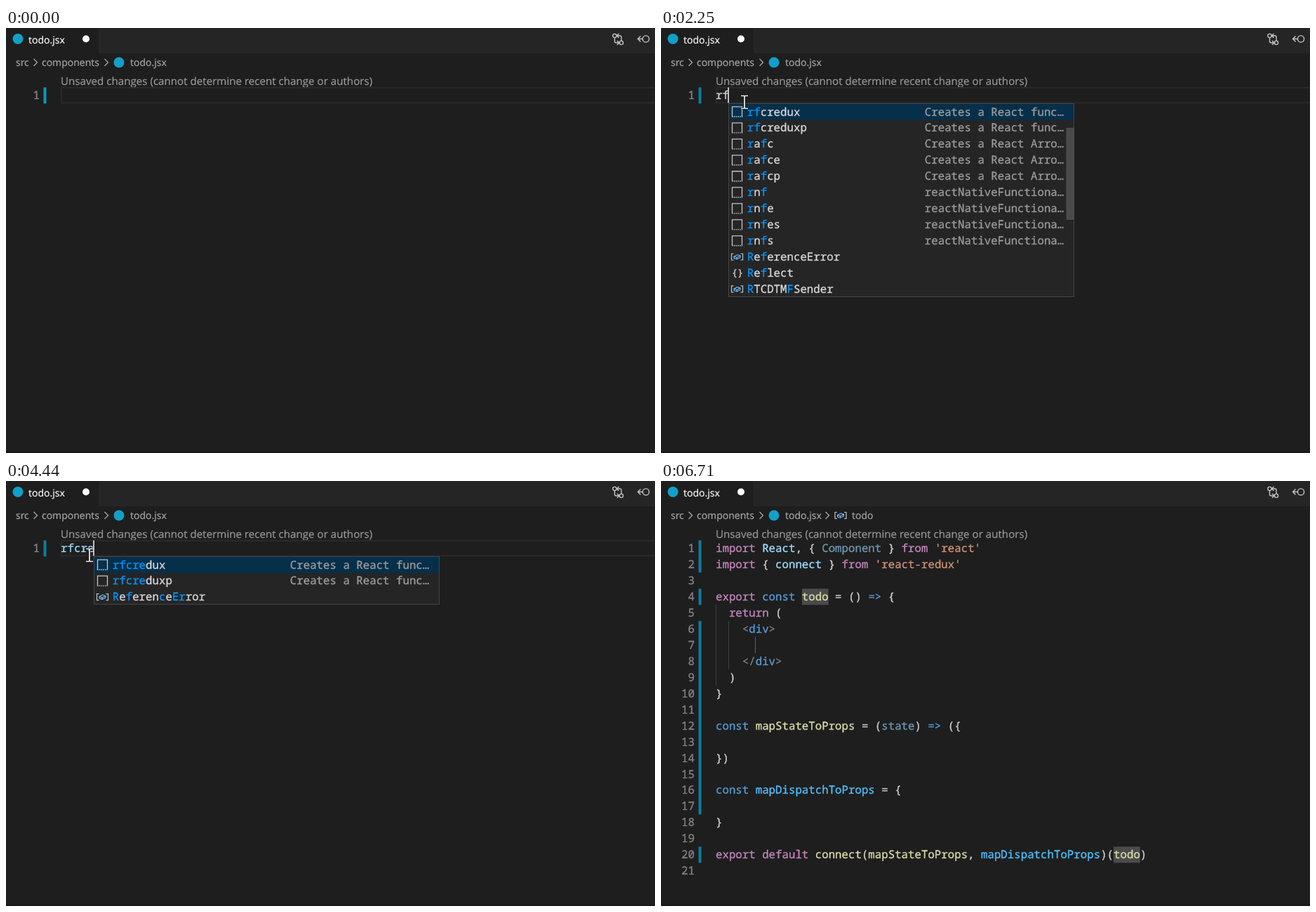
An HTML page for the animation above (6.94 s loop, 925 px wide and 605 px high).

```html
<!DOCTYPE html>
<html lang="en">
<head>
<meta charset="utf-8">
<title>Snippet completion</title>
<style>
html, body { margin: 0; width: 100%; height: 100%; overflow: hidden; background: #1e1e1e; }
svg { display: block; width: 925px; height: 605px; }
text { white-space: pre; text-rendering: geometricPrecision; font: 15.75px "Noto Sans Mono", monospace; }
text, tspan { fill: currentColor; stroke: currentColor; stroke-width: .32px; }
.ui { font: 14px "Open Sans", sans-serif; stroke-width: .2px; }
.lens { font-size: 15.15px; }
</style>
</head>
<body>
<svg id="stage" viewBox="0 0 925 605"></svg>
<script>
const LOOP = 6940, LEFT = 78, CHAR = 9.45, ROW = 22.95;
const COLORS = { p: '#c586c0', b: '#569cd6', y: '#dcdcaa', w: '#d4d4d4', v: '#9cdcfe',
  d: '#6d98ae', s: '#ce9178', c: '#4fc1ff', g: '#808080' };

// ~x switches to colour x
const CODE = [
  "~pimport ~vReact~w, { ~dComponent~w } ~pfrom ~s'react'",
  "~pimport ~w{ ~vconnect~w } ~pfrom ~s'react-redux'",
  '',
  '~pexport ~bconst ~ytodo~w = () ~b=>~w {',
  '~p  return ~w(',
  '~g    <~bdiv~g>',
  '',
  '~g    </~bdiv~g>',
  '~w  )',
  '~w}',
  '',
  '~bconst ~ymapStateToProps~w = (~dstate~w) ~b=>~w ({',
  '',
  '~w})',
  '',
  '~bconst ~cmapDispatchToProps~w = {',
  '',
  '~w}',
  '',
  '~pexport default ~yconnect~w(~ymapStateToProps~w, ~cmapDispatchToProps~w)(~ytodo~w)',
  ''
];

// kind, name (* marks a matched letter), detail
const FUNC = 'Creates a React Func…', REDUX = 'Creates a React func…',
  ARROW = 'Creates a React Arro…', NATIVE = 'reactNativeFunctiona…';
const LISTS = {
  rf: { thumb: [142, 131], rows: [
    ['s', '*r*fcredux', REDUX], ['s', '*r*fcreduxp', REDUX],
    ['s', '*ra*fc', ARROW], ['s', '*ra*fce', ARROW], ['s', '*ra*fcp', ARROW],
    ['s', '*rn*f', NATIVE], ['s', '*rn*fe', NATIVE], ['s', '*rn*fes', NATIVE], ['s', '*rn*fs', NATIVE],
    ['v', '*Re*ferenceError'], ['m', '*Re*flect'], ['v', '*RTCDTM*FSender']] },
  rfc: { thumb: [108, 220], rows: [
    ['s', '*r*f*c', FUNC], ['s', '*r*f*ce', FUNC], ['s', '*r*f*cp', FUNC],
    ['s', '*r*f*credux', REDUX], ['s', '*r*f*creduxp', REDUX],
    ['s', '*ra*f*c', ARROW], ['s', '*ra*f*ce', ARROW], ['s', '*ra*f*cp', ARROW],
    ['m', '*Re*fle*ct'], ['v', '*RTCDTM*FTone*ChangeEvent'],
    ['v', '*Re*feren*ceError'], ['v', '*RTCSsrc*Con*flictEvent']] },
  rfcr: { rows: [
    ['s', '*r*f*c*redux', REDUX], ['s', '*r*f*c*reduxp', REDUX], ['v', '*Re*feren*ceE*rror'],
    ['v', 'Pe*r*forman*ceObse*rver'], ['v', 'Pe*r*forman*ceSe*rverTiming']] },
  rfcre: { rows: [
    ['s', '*r*f*c*r*edux', REDUX], ['s', '*r*f*c*r*eduxp', REDUX], ['v', '*Re*feren*ce*E*rror']] }
};

const within = (t, a, b) => t >= a && t < b;
const at = (t, keys) => keys.filter(k => k[0] <= t).pop()[1];
const esc = s => s.replace(/</g, '&lt;').replace(/>/g, '&gt;');
const rect = (x, y, w, h, fill, more = '') =>
  `<rect x="${x}" y="${y}" width="${w}" height="${h}" fill="${fill}" ${more}/>`;
const line = (d, color, width = 1.3, more = '') =>
  `<path d="${d}" fill="none" stroke="${color}" stroke-width="${width}" ${more}/>`;
const dot = (x, y, r, fill) => `<circle cx="${x}" cy="${y}" r="${r}" fill="${fill}"/>`;
const ring = (x, y, r) => `<circle cx="${x}" cy="${y}" r="${r}" fill="none" stroke="#c5c5c5" stroke-width="1.4"/>`;
const span = (body, color) => `<tspan color="${color}">${body}</tspan>`;
const text = (x, y, body, color, more = '') => `<text x="${x}" y="${y}" color="${color}" ${more}>${body}</text>`;
const ui = (x, y, body, color) => text(x, y, body, color, 'class="ui"');
const chevron = x => line(`M${x - 2.5} 44l5 5l-5 5`, '#a9a9a9', 1.3);
const caret = (col, y) => rect(Math.floor(LEFT + CHAR * col) - 1, y, 2, 22, '#c0c1bf');
const bar = (y, rows, fill) => rect(53.5, y, 4, ROW * rows, fill);
const number = (n, y) => text(48, y, n, '#858585', 'text-anchor="end"');

function symbol(x, y) {
  return line(`M${x + 3} ${y - 4.5}h-3v9h3M${x + 13} ${y - 4.5}h3v9h-3`, '#c5c5c5', 1.2) +
    line(`M${x + 3.5} ${y - .5}l5-2.5l4 1.5v2.5l-5 2.5l-4-1.5zl4 1.5l5-2.5m-5 2.5v2.5`, '#75beff', 1.1);
}

function icon(kind, x, y) {
  if (kind === 'v') return symbol(x + 4, y);
  if (kind === 'm') return text(x + 4.5, y + 4, '{}', '#d0d0d0', 'style="font-size:13.5px"');
  return line(`M${x + 5} ${y + 7}v-14h14v14`, '#c5c5c5') +
    line(`M${x + 4.5} ${y + 7}h15`, '#c5c5c5', 1.4, 'stroke-dasharray="1.6 1.2"');
}

function popup(word) {
  const { rows, thumb } = LISTS[word];
  const x = Math.floor(LEFT + CHAR * word.length) + .5;
  let out = rect(x, 107.5, 492, 23 * rows.length - 1, '#252526', 'stroke="#454545"') +
    rect(x + .5, 108, 491, 23, '#062f4a');
  rows.forEach(([kind, name, detail], i) => {
    const y = 119.2 + i * ROW;
    out += icon(kind, x, y) +
      text(x + 26.3, y + 5.3, name.replace(/\*(.)/g, (_, c) => span(c, '#0097fb')), '#d8d8d8');
    if (detail) out += text(x + 279.3, y + 5.3, detail, '#9c9c9c');
  });
  if (thumb) out += rect(x + 481, thumb[0], 11, thumb[1], 'rgba(121,121,121,.45)');
  return out;
}

function chrome() {
  const c = '#c5c5c5';
  return rect(0, 0, 925, 36, '#252526') + rect(0, 0, 132, 36, '#1e1e1e') + rect(0, 603, 925, 2, '#1a151b') +
    dot(17, 15.5, 7.5, '#12a0c8') + ui(32, 21.5, 'todo.jsx', '#fff') + dot(114, 15.5, 5, '#fff') +
    ring(867.5, 11, 2.6) + ring(877, 21, 2.6) +
    line('M867.5 14v5q0 2 2 2h4m-2.5-3l3 3l-3 3M877 18v-5q0-2-2-2h-4m2.5-3l-3 3l3 3', c, 1.4) +
    ring(912, 15.5, 4.6) + line('M907 15.5h-6.5m4-4l-4 4l4 4', c, 1.4) +
    ui(14, 54, 'src', '#a9a9a9') + chevron(42) + ui(51, 54, 'components', '#a9a9a9') + chevron(143) +
    dot(161, 49, 7.5, '#12a0c8') + ui(177, 54, 'todo.jsx', '#a9a9a9');
}

const lens = () => text(LEFT, 81, 'Unsaved changes (cannot determine recent change or authors)', '#999', 'class="ui lens"');

function typing(t) {
  const word = at(t, [[0, ''], [1950, 'r'], [2160, 'rf'], [2800, 'rfc'], [3260, 'rfcr'], [3500, 'rfcre']]);
  const list = at(t, [[0, ''], [2240, 'rf'], [2880, 'rfc'], [3260, 'rfcr'], [3500, 'rfcre']]);
  const bare = within(t, 1950, 2160), top = bare ? 62 : 84.5;
  let out = bare ? '' : lens();
  out += rect(79, top + .5, 860, 21.5, 'none', 'stroke="#292929" stroke-width="2"') +
    bar(top, 1, t < 1950 ? '#0b98bb' : '#0c7d9d') + number(1, top + 16.7) +
    text(LEFT, top + 16.7, word, word.length === 2 ? COLORS.w : COLORS.v);
  if (within(t, 2410, 2800)) out += text(157, 101.2, 'You, a few seconds ago • Uncommitted changes', '#484848');
  if (within(t, 1160, 1700) || within(t, 1950, 3980) || t >= 4440) out += caret(word.length, top);
  return out + (list ? popup(list) : '');
}

function program(t) {
  const top = n => 84.5 + (n - 1) * ROW;
  const focused = t < 6230, blink = t < 5060 || within(t, 5540, 6060);
  let out = lens();
  if (t >= 5060) out += chevron(237) + symbol(248, 49) + ui(272, 54, 'todo', '#a9a9a9');
  for (const [n, rows] of [[1, 2], [4, 1], [6, 12], [20, 1]]) out += bar(top(n), rows, '#0c7d9d');
  for (const [col, n, rows, color] of [[0, 5, 5, '#404040'], [2, 6, 3, '#404040'], [6, 7, 1, '#606060']])
    out += rect(Math.floor(LEFT + col * CHAR), top(n), 1, rows * ROW, color);
  for (const [col, n] of [[13, 4], [60, 20]])
    out += rect(LEFT + col * CHAR, top(n), 4 * CHAR, ROW, focused ? '#37536f' : '#4b4b4c');
  CODE.forEach((src, i) => {
    const y = top(i + 1) + 16.7;
    const spans = src.split('~').slice(1).map(s => {
      const key = s[0] === 'd' && t < 5060 ? 'v' : s[0];
      return span(esc(s.slice(1)), COLORS[key]);
    });
    out += number(i + 1, y) + text(LEFT, y, spans.join(''), COLORS.w);
  });
  if (blink) out += caret(17, top(4)) + caret(64, top(20));
  return out;
}

// time, x, y of the pointer
const PATH = [[470, 230, 253], [1000, 119, 105.5], [4910, 119, 105.5], [5540, 417, 280],
  [5850, 417, 280], [6230, 440, 620]];

function pointer(t) {
  const i = PATH.findIndex(p => p[0] > t);
  if (i < 1) return '';
  const [a, b] = [PATH[i - 1], PATH[i]], n = Math.round((b[0] - a[0]) / 77);
  const k = Math.floor((t - a[0]) / (b[0] - a[0]) * n) / n;
  const x = a[1] + (b[1] - a[1]) * k, y = a[2] + (b[2] - a[2]) * k;
  const d = `M${x - 5} ${y - 9}h4l1 1l1-1h4M${x} ${y - 8}v16M${x - 5} ${y + 9}h4l1-1l1 1h4`;
  return line(d, '#111', 3) + line(d, '#f0f0f0', 1.7);
}

const stage = document.getElementById('stage');
let shown = '';

function draw(now) {
  const t = now % LOOP;
  const picture = chrome() + (t < 4590 ? typing(t) : program(t)) + pointer(t);
  if (picture !== shown) stage.innerHTML = shown = picture;
  requestAnimationFrame(draw);
}
draw(0);
</script>
</body>
</html>
```
